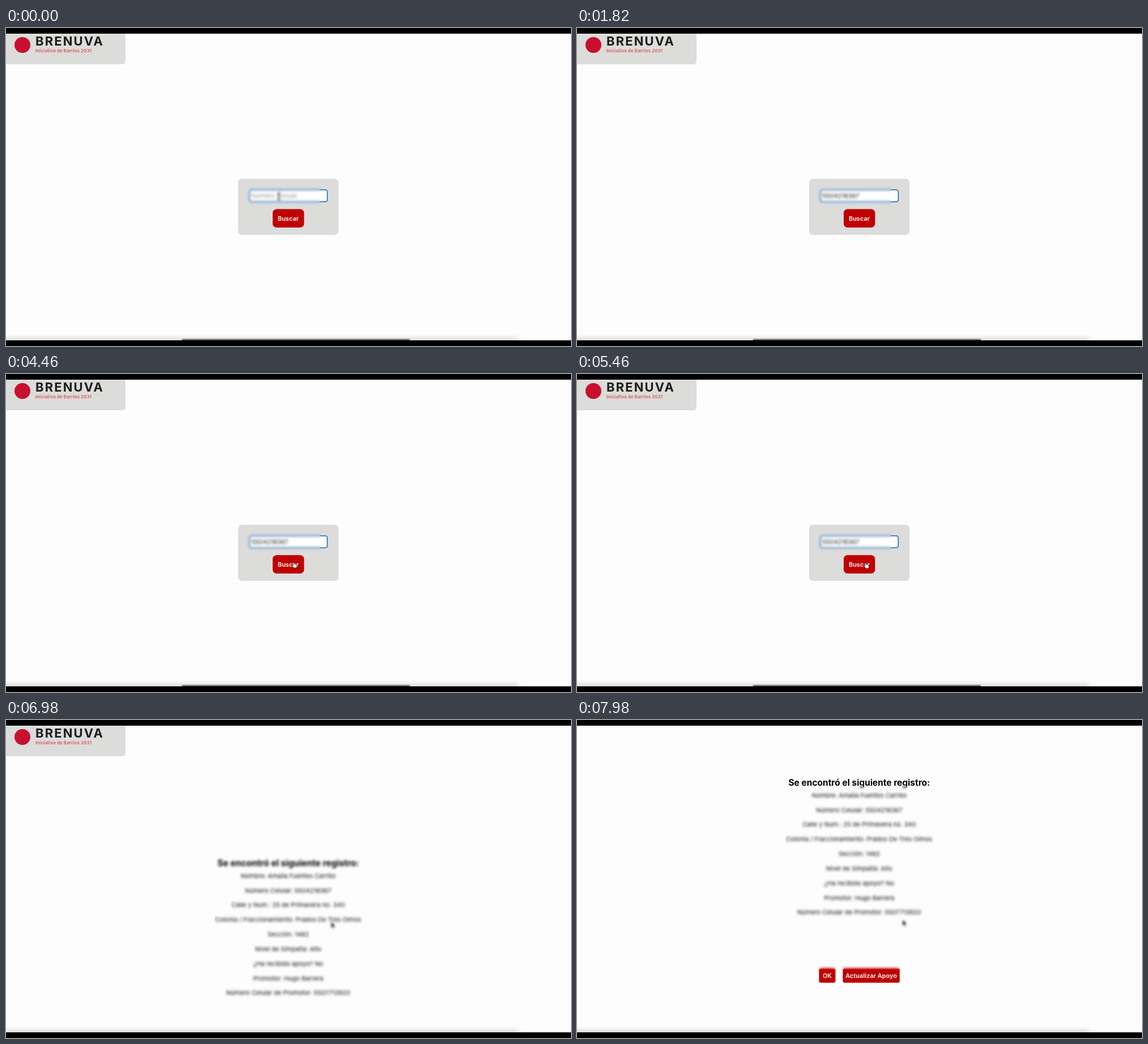
Recreate the animation shown at these times as an HTML page. Size 998 px wide and 561 px high, loop 8000 ms.

```html
<!DOCTYPE html>
<html lang="es">
<head>
<meta charset="utf-8">
<style>
html, body { margin: 0; width: 100%; height: 100%; overflow: hidden; background: #fdfdfd; }
svg { position: absolute; left: 0; top: 0; display: block; }
text { font-family: Inter, sans-serif; font-size: 11px; }
.mid { text-anchor: middle; }
.btn { fill: #c00000; }
.label { fill: #fff; font-weight: 600; text-anchor: middle; }
#veil { position: absolute; backdrop-filter: blur(2px); }
</style>
</head>
<body>
<svg width="998" height="561" viewBox="0 0 998 561">
  <defs>
    <filter id="soft" x="-10%" y="-100%" width="120%" height="300%"><feGaussianBlur stdDeviation="4"/></filter>
    <filter id="thin" x="-5%" y="-100%" width="110%" height="300%"><feGaussianBlur stdDeviation="1.2"/></filter>
  </defs>

  <g id="page">
    <path d="M0 0H211V58Q211 64 205 64H0Z" fill="#dcdcdb"/>
    <circle cx="29" cy="30" r="14" fill="#c8102e"/>
    <text x="52" y="31" font-weight="700" style="font-size:22px;letter-spacing:2.1px" fill="#1c1c1c">BRENUVA</text>
    <text x="52" y="42.6" font-weight="700" style="font-size:7.7px;letter-spacing:.2px" fill="#d8655c">Iniciativa de Barrios 2031</text>

    <g id="form">
      <rect x="410" y="266" width="177.5" height="99" rx="7" fill="#dcdcdb"/>
      <rect id="field" x="430" y="285.5" width="137.5" height="21" rx="3.5" fill="#fff" stroke-width="1.5"/>
      <text id="value" x="433.5" y="300"></text>
      <rect class="btn" x="471" y="319.5" width="55.5" height="32.5" rx="7"/>
      <text class="label" x="498.5" y="340">Buscar</text>
    </g>

    <g id="record">
      <text class="mid" x="498.5" y="258" font-weight="700" style="font-size:15.5px">Se encontró el siguiente registro:</text>
      <g id="lines" class="mid" fill="#111"></g>
      <rect class="btn" x="427.5" y="579.5" width="29" height="26" rx="3.5"/>
      <text class="label" x="442" y="596.7">OK</text>
      <rect class="btn" x="469.5" y="579.5" width="100.5" height="26" rx="3.5"/>
      <text class="label" x="519.7" y="596.7">Actualizar Apoyo</text>
    </g>
  </g>

  <rect x="-30" y="547" width="935" height="20" fill="#d6d7d6" filter="url(#soft)"/>
  <rect id="dock" x="311" y="549" width="402" height="6" fill="#444" filter="url(#thin)"/>
  <path d="M0 0H998V10H0ZM0 551H998V561H0Z"/>

  <g id="cursor">
    <path id="beam" d="M-2.5 -6Q0 -6 0 -4Q0 -6 2.5 -6M0 -4V4M-2.5 6Q0 6 0 4Q0 6 2.5 6" fill="none" stroke="#222" stroke-width="1.4"/>
    <path id="arrow" d="M-3 -6V5L-.5 2.8L1.2 6.6L3 5.8L1.4 2.2H4.8Z" fill="#111" stroke="#fff" stroke-width=".8"/>
    <path id="hand" d="M-3 -5Q-1.6 -6 -1 -4L-.2 -1.6Q1 -2.4 1.6 -1.4Q2.8 -2 3.2 -.8Q4.6 -1 4.7 .6Q5 3 3.8 5H-1Q-2 3 -4 1.2Q-4 -.2 -2 .6Z" fill="#fff" stroke="#222" stroke-width=".9"/>
  </g>
</svg>
<div id="veil"></div>

<script>
const $ = id => document.getElementById(id);
const LOOP = 8000, SWITCH = 6700, BLUR_FIELD = 5900, SCROLL = 142;
const number = '5504218367';

const rows = [
  'Nombre: Amalia Fuentes Carrillo',
  'Número Celular: ' + number,
  'Calle y Num.: 25 de Primavera no. 340',
  'Colonia / Fraccionamiento: Prados De Tres Olmos',
  'Sección: 1482',
  'Nivel de Simpatía: Alto',
  '¿Ha recibido apoyo? No',
  'Promotor: Hugo Barrera',
  'Número Celular de Promotor: 5507713920'
];
$('lines').innerHTML = rows.map((s, i) =>
  `<text x="498.5" y="${278.8 + i * 25.82}">${s}</text>`).join('');

// Pointer path: time, x, y
const path = [
  [0, 482, 297], [2400, 482, 297], [2700, 523, 295], [2950, 523, 295],
  [3600, 509, 337], [4600, 509, 337], [5200, 511, 338], [6700, 511, 338],
  [7000, 578, 362], [7100, 578, 362], [7400, 578, 358], [LOOP, 578, 358]
];
const ease = p => p * p * (3 - 2 * p);
const ramp = (t, a, b) => ease(Math.min(1, Math.max(0, (t - a) / (b - a))));
const show = (id, on) => $(id).setAttribute('visibility', on ? 'visible' : 'hidden');
const move = (id, x, y) => $(id).setAttribute('transform', `translate(${x} ${y})`);

function pointer(t) {
  const i = path.findIndex(k => k[0] > t);
  const [a, x, y] = path[i - 1], [b, u, v] = path[i];
  const p = ramp(t, a, b);
  return [x + (u - x) * p, y + (v - y) * p];
}

function veil(x, y, right, bottom) {
  Object.assign($('veil').style, {
    left: x + 'px', top: y + 'px', width: right - x + 'px', height: bottom - y + 'px'
  });
}

function draw(t) {
  const found = t >= SWITCH;
  const scroll = SCROLL * ramp(t, 7120, 7400);
  show('form', !found);
  show('record', found);
  show('dock', !found);
  move('page', 0, -scroll);

  const typed = Math.min(10, Math.max(0, Math.floor((t - 40) / 72)));
  $('value').textContent = typed ? number.slice(0, typed) : 'Número Celular';
  $('value').setAttribute('fill', typed ? '#222' : '#999');
  $('field').setAttribute('stroke', t < BLUR_FIELD ? '#1260b4' : 'none');

  const [x, y] = pointer(t);
  const inField = !found && y < 308, onButton = !found && y >= 320;
  move('cursor', x, y);
  show('beam', inField && (t < 100 || t > 2400));
  show('hand', onButton);
  show('arrow', !inField && !onButton);

  if (found) veil(368, 117, 630, scroll > 100 ? 440 : 495);
  else veil(424, 279, 555, 313);
}

function tick(now) {
  draw(now % LOOP);
  requestAnimationFrame(tick);
}
draw(0);
requestAnimationFrame(tick);
</script>
</body>
</html>
```
